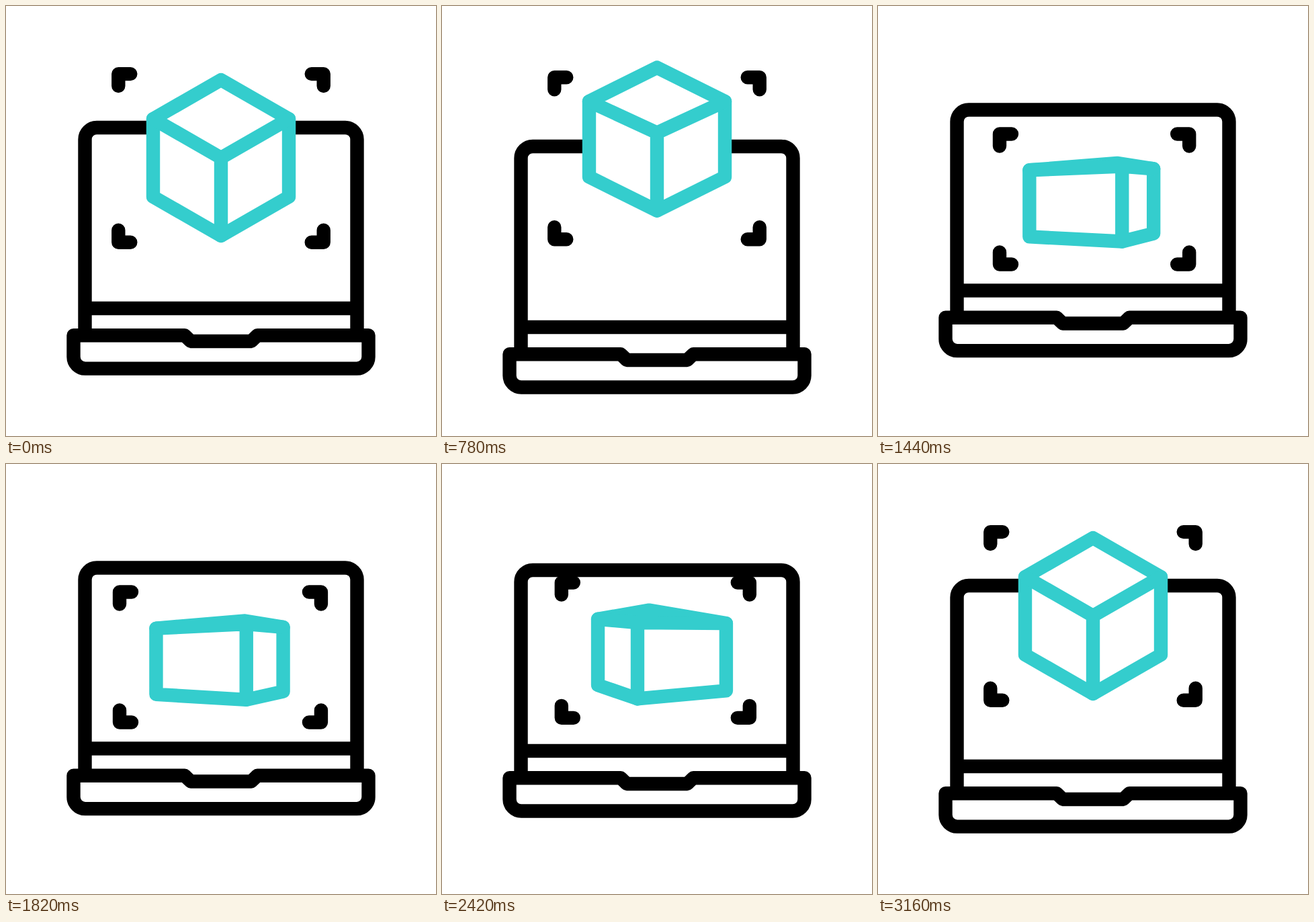
An HTML page that plays this animation: 640x640 px, repeating every 3.3 s.

```html
<!DOCTYPE html>
<html lang="en">
<head>
<meta charset="utf-8">
<title>Cube and laptop</title>
<style>
  html, body { margin: 0; width: 100%; height: 100%; overflow: hidden; background: #fff; }
  svg { display: block; width: 100vw; height: 100vh; }
  path { fill: none; stroke: #000; stroke-width: 20.4; stroke-linecap: round; stroke-linejoin: round; }
  #laptop path { stroke-linecap: butt; }
  #cube path { stroke: #34cdcd; }
  #cube #hull { fill: #fff; }
</style>
</head>
<body>
<svg viewBox="0 0 640 640">
  <g id="laptop">
    <path d="M117.5 490V198.500A17.500 17.500 0 0 1 135 181H505A17.500 17.500 0 0 1 522.500 198.500V490M117.500 450H522.500"/>
    <path d="M100.500 490.300H266L275 499H365L374 490.300H539.500V522A17.500 17.500 0 0 1 522 539.600H118A17.500 17.500 0 0 1 100.500 522Z"/>
  </g>
  <path id="corners"/>
  <g id="cube"><path id="hull"/><path id="edges"/></g>
</svg>
<script>
const LOOP = 3300, R = 101, MID = 320;
const $ = id => document.getElementById(id);
const laptop = $('laptop'), corners = $('corners'), hull = $('hull'), edges = $('edges');
const mix = (a, b, f) => a + (b - a) * f;
const clamp = v => Math.max(0, Math.min(1, v));
const ease = u => (1 - Math.cos(Math.PI * u)) / 2;
const span = (t, a, b, p = 1) => ease(clamp((t - a) / (b - a)) ** p);
const pt = p => p[0].toFixed(2) + ' ' + p[1].toFixed(2);
const line = pts => 'M' + pts.map(pt).join('L');

function pose(t) {
  const lift = span(t, 355, 650), fold = span(t, 650, 1132);
  const back = span(t, 2320, 2880, 0.84);
  // rest -> lifted -> folded -> rest
  const track = (rest, up, flat) => mix(mix(mix(rest, up, lift), flat, fold), rest, back);
  return {
    lid: track(0, 39, -26.5),
    open: track(1, 1, 0),
    cubeX: MID + 8 * Math.sin(2 * Math.PI * back),
    cubeY: t < 1200 ? mix(226, 179, lift) : 226,
    frameY: track(226.4, 214.4, 287.5) - 6 * Math.sin(Math.PI * back),
    frameH: track(125.3, 125.3, 97),
    turn: 2 * Math.PI * span(t, 1270, 2295) - Math.PI * back ** 1.1,
    swing: 2 * Math.PI * span(t, 1270, 2330) - Math.PI * back
  };
}

function drawCorners(p) {
  const s = Math.sin(p.swing);
  const half = 152.7 - 80 * s * s;
  let d = '';
  for (const h of [-1, 1]) for (const v of [-1, 1]) {
    const x = MID + 5.5 * s + h * half, y = p.frameY + v * p.frameH;
    d += line([[x - 18 * h, y], [x, y], [x, y - 18 * v]]);
  }
  corners.setAttribute('d', d);
}

function drawCube(p) {
  const quarter = Math.PI / 2;
  const a = p.turn - quarter * Math.round(p.turn / quarter);
  const o = p.open;
  const corner = ang => {
    const z = Math.cos(ang);
    return {
      x: p.cubeX + R * Math.sin(ang) / (1 - 0.06 * (1 - o) * z),
      top: mix(245 + 2.5 * z - 10.5 * z * z, p.cubeY + 58 * (z - 1), o),
      low: mix(340 + 6 * z + 6 * z * z, p.cubeY + 58 * (z + 1), o)
    };
  };
  const [f, r, b, l] = [0, 1, 2, 3].map(i => corner(a + i * quarter));
  b.x = mix(p.cubeX + 36 * Math.sin(4 * a), b.x, Math.min(1, 2 * o));
  const up = c => [c.x, c.top], dn = c => [c.x, c.low];
  hull.setAttribute('d', line([up(l), up(b), up(r), dn(r), dn(f), dn(l)]) + 'Z');
  edges.setAttribute('d', line([up(l), up(f), up(r)]) + line([up(f), dn(f)]));
}

function draw(t) {
  const p = pose(t);
  laptop.setAttribute('transform', `translate(0 ${p.lid.toFixed(2)})`);
  drawCorners(p);
  drawCube(p);
}

let start;
function tick(now) {
  start ??= now;
  draw((now - start) % LOOP);
  requestAnimationFrame(tick);
}
draw(0);
requestAnimationFrame(tick);
</script>
</body>
</html>
```
